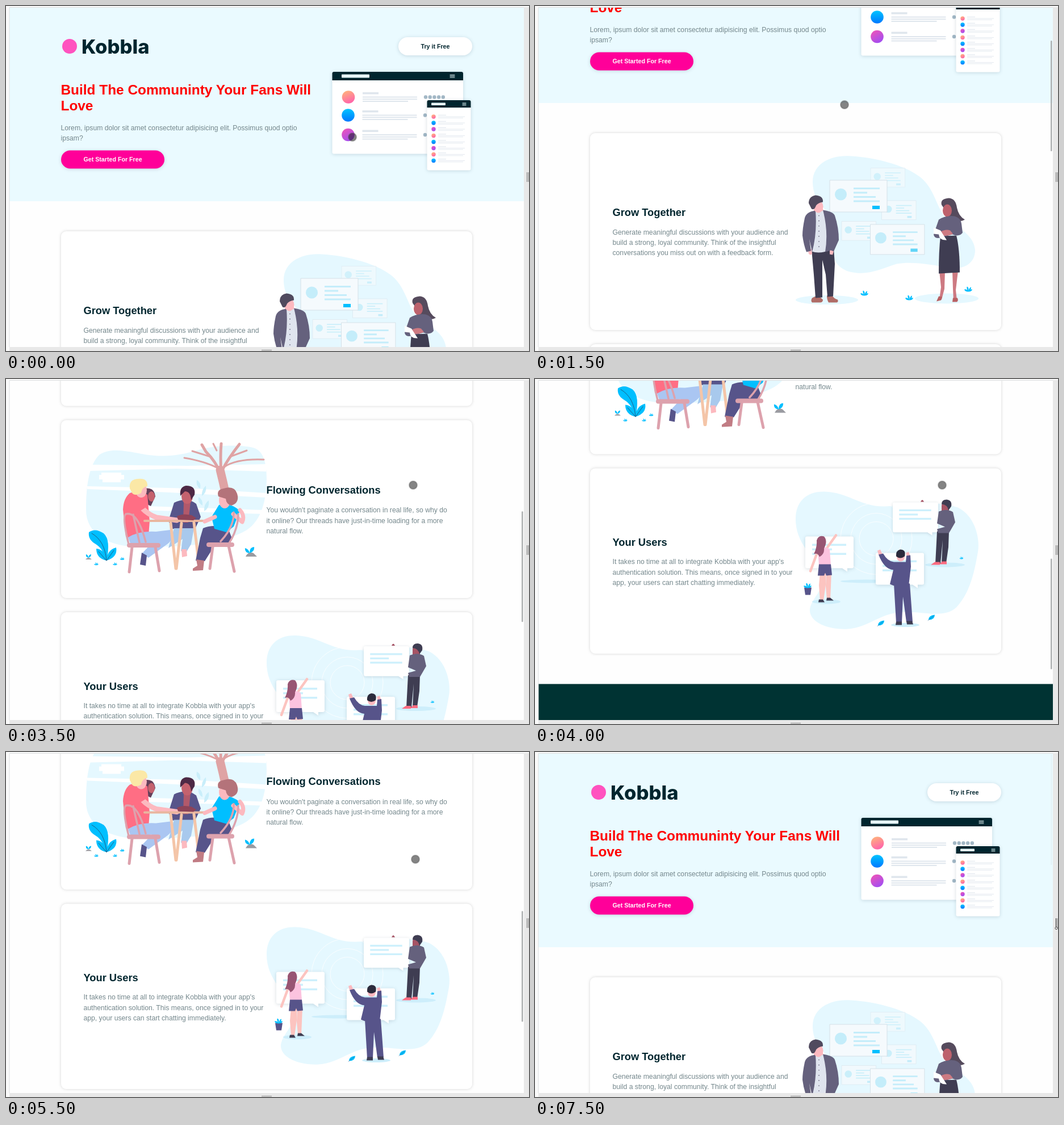
Animation, 921 px wide and 608 px high, one loop 8000 ms. Source, as an HTML page:

```html
<!DOCTYPE html>
<html lang="en">
<head>
<meta charset="utf-8">
<title>Kobbla landing page</title>
<style>
@property --s { syntax: "<number>"; inherits: true; initial-value: 0; }
@property --x { syntax: "<number>"; inherits: true; initial-value: 0; }
@property --y { syntax: "<number>"; inherits: true; initial-value: 0; }
@property --bar { syntax: "<number>"; inherits: true; initial-value: 0; }
@property --grip { syntax: "<number>"; inherits: true; initial-value: 0; }

html, body { margin: 0; width: 100%; height: 100%; overflow: hidden; background: #fafafa; }
#stage { display: block; width: 921px; height: 608px; animation: tour 8s step-end infinite; }

/* s: scroll, x/y: pointer, bar: scrollbar opacity, grip: hovering the splitter */
@keyframes tour {
  0%      { --s: 0;      --x: 610; --y: 231; --bar: 0;   --grip: 0; }
  6.25%   { --s: 0;      --x: 592; --y: 212; --bar: 0;   --grip: 0; }
  12.5%   { --s: 0;      --x: 560; --y: 185; --bar: 0;   --grip: 0; }
  18.75%  { --s: 173;    --x: 545; --y: 174; --bar: 1;   --grip: 0; }
  25%     { --s: 299;    --x: 700; --y: 185; --bar: 1;   --grip: 0; }
  31.25%  { --s: 425.5;  --x: 717; --y: 187; --bar: 1;   --grip: 0; }
  37.5%   { --s: 561;    --x: 717; --y: 187; --bar: 1;   --grip: 0; }
  43.75%  { --s: 696.5;  --x: 717; --y: 187; --bar: 1;   --grip: 0; }
  50%     { --s: 950;    --x: 717; --y: 187; --bar: 1;   --grip: 0; }
  56.25%  { --s: 1197.5; --x: 720; --y: 189; --bar: 1;   --grip: 0; }
  62.5%   { --s: 1197.5; --x: 721; --y: 189; --bar: .15; --grip: 0; }
  68.75%  { --s: 840;    --x: 721; --y: 189; --bar: 1;   --grip: 0; }
  75%     { --s: 440;    --x: 724; --y: 190; --bar: 1;   --grip: 0; }
  81.25%  { --s: 72.5;   --x: 727; --y: 191; --bar: 1;   --grip: 0; }
  87.5%   { --s: 0;      --x: 908; --y: 292; --bar: .6;  --grip: 0; }
  93.75%, 100% { --s: 0; --x: 918; --y: 310; --bar: .1;  --grip: 1; }
}
#page { transform: translateY(calc(var(--s) * -1px)); }
#thumb { transform: translateY(calc(var(--s) * .329px)); opacity: var(--bar); }
#pointer { transform: translate(calc(var(--x) * 1px), calc(var(--y) * 1px)); opacity: calc(1 - var(--grip)); }
#grip { opacity: var(--grip); }

text { font: 12.2px "Liberation Sans", Arial, sans-serif; fill: #74878c; }
.logo { font: 800 34.5px Inter, sans-serif; fill: #00252e; }
.title { font-size: 24.4px; font-weight: bold; fill: #f00; }
.head { font-size: 18.3px; font-weight: bold; fill: #00252e; }
.btn { font-size: 10.68px; font-weight: bold; text-anchor: middle; }
.foot text { fill: #fff; }
.panel { fill: #fff; filter: drop-shadow(0 0 2.5px rgba(0,0,0,.17)); }
.soft { filter: drop-shadow(0 1px 3px rgba(0,40,60,.16)); }
.line { fill: none; stroke-linecap: round; stroke-linejoin: round; }
.sky { fill: #e5f8ff; }
.blue { fill: #00bfff; }
.slate { fill: #65617d; }
.night { fill: #3f3d52; }
.indigo { fill: #57548a; }
.skin { fill: #fcb9bf; }
.tan { fill: #cd7a82; }
</style>
</head>
<body>
<svg id="stage" viewBox="0 0 921 608">
<defs>
  <linearGradient id="peach" x2=".4" y2="1"><stop stop-color="#ffb978"/><stop offset="1" stop-color="#ff68a8"/></linearGradient>
  <linearGradient id="azure" x2="0" y2="1"><stop stop-color="#00c4ff"/><stop offset="1" stop-color="#0078ff"/></linearGradient>
  <linearGradient id="violet" x2=".6" y2="1"><stop stop-color="#f455b4"/><stop offset="1" stop-color="#a44df0"/></linearGradient>

  <g id="row"><path d="M25-8.5h28v3.5h-28zM25-1h96v2h-96zM25 2.8h96v2h-96zM25 6.6h80v2h-80z" fill="#dfe6ed"/><circle r="11.3"/></g>
  <g id="mini"><path d="M8-3.3h14v1.2h-14zM8-.5h47v1h-47zM8 1.7h44v1h-44z" fill="#e4e9f0"/><circle r="3.7"/></g>
  <g id="post">
    <path d="M0 0h101v56h-101z" fill="#f5fafd" stroke="#d4e0e7"/>
    <circle cx="19.5" cy="25" r="10.5" fill="#c4edfa"/>
    <path d="M42 13h46v3h-46zM42 20.5h24v3h-24zM42 28h39v3h-39zM42 35.5h46v3h-46z" fill="#c4edfa"/>
    <path d="M75 45h13v6h-13z" fill="currentColor"/>
  </g>
  <g id="sprout" class="blue"><path d="M0 4Q-6 4-7 0Q-2-1 0 4Q-4-3-2-5Q2-3 0 4Q2-4 5-4Q5 1 0 4Q4-1 7 0Q6 4 0 4z"/></g>
  <g id="bubble">
    <path class="soft" d="M3 0h79q3 0 3 3v50q0 3-3 3h-8v6l-9-6h-62q-3 0-3-3v-50q0-3 3-3z" fill="#fff"/>
    <path d="M12 13h60v3.5h-60zM12 21h35v3.5h-35zM12 29h60v3.5h-60z" fill="#cdf0fc"/>
  </g>
  <g id="leaf"><path class="blue" d="M-5 4Q-5-4 6-5Q6 4-5 4z"/><path class="line" d="M-6 5L4-3" stroke="#2a6b9c" stroke-width=".6"/></g>
</defs>

<svg x="6" y="2" width="906" height="599" viewBox="6 2 906 599">
<g id="page">
  <path d="M6 2h906v1800h-906z" fill="#fefefe"/>

  <!-- hero -->
  <path d="M6 2h906v342h-906z" fill="#eafaff"/>
  <circle cx="112" cy="71" r="13" fill="#ff52bf"/>
  <text class="logo" x="133" y="84">Kobbla</text>
  <rect class="soft" x="691" y="55" width="130" height="32" rx="16" fill="#fff"/>
  <text class="btn" x="756" y="74.5" style="fill:#00252e">Try it Free</text>
  <text class="title" x="96.5" y="155.6">Build The Communinty Your Fans Will</text>
  <text class="title" x="96.5" y="183.6">Love</text>
  <text x="96.5" y="219.3">Lorem, ipsum dolor sit amet consectetur adipisicing elit. Possimus quod optio</text>
  <text x="96.5" y="237.4">ipsam?</text>
  <rect class="soft" x="97" y="254.5" width="182" height="32" rx="16" fill="#f09"/>
  <text class="btn" x="188" y="274" style="fill:#fff">Get Started For Free</text>

  <g>
    <rect class="soft" x="574.5" y="116" width="230.5" height="144.5" rx="3" fill="#fff"/>
    <path d="M574.5 131v-12q0-3 3-3h224.500q3 0 3 3v12z" fill="#00252e"/>
    <rect x="591" y="120.500" width="49" height="6" rx="1" fill="#e8f6f8"/>
    <path class="line" d="M782 121.500h8m-8 2.200h8m-8 2.200h8" stroke="#e8f6f8"/>
    <use href="#row" x="603" y="160.500" fill="url(#peach)"/>
    <use href="#row" x="602.500" y="192.500" fill="url(#azure)"/>
    <use href="#row" x="602.500" y="227" fill="url(#violet)"/>
    <path class="line" d="M739 160.500h32M738 192.500h.01M738 227h.01" stroke="#a3b8c6" stroke-width="6.400" stroke-dasharray=".01 7.700"/>
    <rect class="soft" x="741.500" y="166" width="77" height="123.500" rx="3" fill="#fff"/>
    <path d="M741.500 179v-10q0-3 3-3h71q3 0 3 3v10z" fill="#00252e"/>
    <rect x="749" y="170.500" width="25" height="4.500" rx="1" fill="#e8f6f8"/>
    <path class="line" d="M804 171h6m-6 2h6m-6 2h6" stroke="#e8f6f8" stroke-width=".9"/>
    <g fill="url(#peach)"><use href="#mini" x="753" y="195"/><use href="#mini" x="753" y="228.500"/><use href="#mini" x="753" y="261.500"/></g>
    <g fill="url(#azure)"><use href="#mini" x="753" y="206"/><use href="#mini" x="753" y="239.500"/><use href="#mini" x="753" y="272.500"/></g>
    <g fill="url(#violet)"><use href="#mini" x="753" y="217"/><use href="#mini" x="753" y="250.500"/></g>
  </g>

  <!-- panels -->
  <rect class="panel" x="97" y="397" width="724" height="347" rx="9"/>
  <rect class="panel" x="97" y="769" width="724" height="313.500" rx="9"/>
  <rect class="panel" x="97" y="1107.500" width="724" height="326.500" rx="9"/>

  <text class="head" x="136.500" y="543">Grow Together</text>
  <text x="136.500" y="576">Generate meaningful discussions with your audience and</text>
  <text x="136.500" y="594.200">build a strong, loyal community. Think of the insightful</text>
  <text x="136.500" y="612.400">conversations you miss out on with a feedback form.</text>

  <text class="head" x="458.500" y="898">Flowing Conversations</text>
  <text x="458.500" y="931.800">You wouldn't paginate a conversation in real life, so why do</text>
  <text x="458.500" y="950">it online? Our threads have just-in-time loading for a more</text>
  <text x="458.500" y="968.200">natural flow.</text>

  <text class="head" x="136.500" y="1244">Your Users</text>
  <text x="136.500" y="1276.400">It takes no time at all to integrate Kobbla with your app's</text>
  <text x="136.500" y="1294.900">authentication solution. This means, once signed in to your</text>
  <text x="136.500" y="1313.400">app, your users can start chatting immediately.</text>

  <!-- two people and posts -->
  <g transform="translate(0 425.500)">
    <path class="sky" d="M489 57C489 25 522 9 556 12C600 14 660 30 684 54C706 76 708 108 728 126C752 141 773 154 775 178C775 200 757 212 732 209C700 204 665 197 637 202C608 211 588 222 560 217C536 213 521 196 524 168C525 138 526 125 510 105C497 91 489 78 489 57z"/>
    <ellipse class="sky" cx="514" cy="265.500" rx="55" ry="8"/>
    <ellipse class="sky" cx="725" cy="263" rx="56" ry="9"/>
    <g color="#bdeafa">
      <use href="#post" transform="translate(591 33) scale(.6)" opacity=".6"/>
      <use href="#post" transform="translate(610.500 90.500) scale(.6)" opacity=".8"/>
      <use href="#post" transform="translate(540 127) scale(.6)" opacity=".8"/>
    </g>
    <use href="#post" x="519" y="54.500" color="#00bfff"/>
    <use href="#post" transform="translate(590.500 132.500) scale(.945)" color="#62d5f7"/>

    <path d="M488 262l10-5 9 8q0 5-5 5h-14q-3-3 0-8zM514 258l8-2q5 8 11 9q2 5-3 5h-13q-3-5-3-12z" fill="#b06c66"/>
    <path class="night" d="M487 176L526 175L528 202L525 259L515 260L512 221L506 195L506 261L494 262L491 221z"/>
    <path class="skin" d="M480 176h7l1 8q-3 4-6 0zM519 176h8l-3 10-5-1zM491 99h16v13h-16z"/>
    <path d="M491 110L511 108L518 178Q501 185 487 180z" fill="#dfe4ee"/>
    <path class="slate" d="M494 108Q478 110 475 121Q471 140 471 152Q473 168 478 181L486 179L483 158L488 181Q497 148 494 108zM507 107Q526 110 528 117Q535 138 535 160L526 180L521 178L511 181Q517 145 507 107z"/>
    <path class="line" d="M500 117v55" stroke="#55516a" stroke-width="1.600" stroke-dasharray=".1 9"/>
    <ellipse cx="499" cy="101" rx="8.500" ry="11" class="skin"/>
    <path d="M482 95Q482 83 494 81Q508 82 507 93Q499 94 495 99Q492 108 487 105Q484 99 482 95z" fill="#504a5e"/>

    <path d="M716 98Q713 87 729 86Q741 87 743 103Q746 118 757 124Q746 130 737 122Q724 120 723 108z" fill="#564b5d"/>
    <ellipse cx="726" cy="108" rx="8" ry="11" fill="#bd626d"/>
    <path class="tan" d="M712 214h10l-1 32-5 19h-4l3-22zM735 214h10l-4 34 2 18h-6l-1-20z"/>
    <path d="M711 259l6 1-2 6-8 2zM736 262h8q2 5-1 7h-8z" fill="#b85f62"/>
    <path class="night" d="M714 153L742 152Q748 175 748 217L711 219Q711 179 714 153z"/>
    <path class="slate" d="M711 124Q724 116 739 118Q750 121 751 131L753 147Q747 155 735 150L713 156Q703 158 702 150z"/>
    <path class="tan" d="M713 146q10-6 18-3l5 6q-10 5-21 3z"/>
    <path d="M702 138L714 143L725 160Q712 161 711 150L702 149z" fill="#fff"/>
    <use href="#sprout" x="580" y="254"/><use href="#sprout" x="659" y="262"/><use href="#sprout" x="763" y="247"/>
  </g>

  <!-- four people at a table -->
  <g transform="translate(0 696.500)">
    <path class="sky" d="M141 231C141 188 146 151 165 133C184 121 208 126 239 132C280 140 312 133 335 126C370 115 417 116 435 121C456 126 459 155 459 177C458 218 449 254 417 270C372 292 300 298 250 294C200 301 141 282 141 231z"/>
    <path d="M148 151L320 153L458 150V163L300 158L146 162zM143 189L330 193L459 201V209L290 200L143 194zM250 224L455 231V238L240 231zM168 165h35v4h5v8h-6v5h-32v-5h-6v-8h4z" fill="#fff"/>
    <g class="line" stroke="#dfa3a4">
      <path d="M387 203Q382 180 377 160" stroke-width="15"/>
      <path d="M378 167Q370 146 352 128L345 116M379 163Q377 138 379 114M381 160Q392 139 411 115" stroke-width="5"/>
      <path d="M373 157Q350 145 314 139M384 155Q407 140 454 142M360 137L328 127M397 136L424 126M371 126L365 114" stroke-width="3"/>
    </g>
    <path d="M336 178q8 4 6 15q-8-4-6-15zM352 188q-8 7-7 18q9-6 7-18zM339 208q8 4 7 15q-9-5-7-15zM357 214q-9 6-8 19q10-6 8-19z" fill="#c9eefa"/>

    <path d="M244 193Q261 190 263 207L255 224L243 218z" fill="#65405a"/>
    <ellipse cx="256" cy="207" rx="6" ry="9" fill="#c5626e"/>
    <path class="indigo" d="M296 218Q319 207 335 220L343 243L332 266L293 264L286 250z"/>
    <path d="M313 216h12l-4 37h-9z" fill="#b2596b"/>
    <ellipse cx="319" cy="207" rx="10" ry="13" fill="#c5626e"/>
    <path d="M307 206Q305 190 317 188Q335 188 332 204L326 213Q325 198 315 198z" fill="#4d2945"/>
    <path d="M296 263h35l-5 28-9 15-9-3 3-21-25 16z" fill="#a8c9ed"/>
    <path class="skin" d="M309 300h9l1 12-9 2z"/>

    <path d="M218 201L235 196L249 204L253 251L250 288L211 278L206 230Q207 210 218 201z" fill="#ff6e84"/>
    <path class="line" d="M235 222Q246 237 265 244L301 249" stroke="#fcb9bf" stroke-width="9"/>
    <path d="M220 207Q238 202 245 227L232 235L214 228z" fill="#ff6e84"/>
    <ellipse class="skin" cx="238" cy="196" rx="10" ry="13"/>
    <path d="M218 193Q216 177 232 176Q250 174 249 189Q240 190 238 201Q227 207 222 201z" fill="#fbe8a6"/>
    <path d="M215 279Q235 267 264 269L289 266Q298 281 284 291L251 315L239 308L257 289L220 293z" fill="#aac6f2"/>
    <path class="indigo" d="M239 306l9 5-2 18-10-2z"/>

    <path class="line" d="M244 250H352" stroke="#e9b69f" stroke-width="4"/>
    <g class="line" stroke="#f4c5a8" stroke-width="5"><path d="M290 254L299 334M309 254L300 334M331 253L339 320"/></g>
    <path d="M301 242q9-6 26-2l8 5-5 4-27-1z" fill="#8d4358"/>

    <path class="indigo" d="M347 263Q365 255 391 263L398 281Q393 294 369 291L350 321L334 320L342 280z"/>
    <path d="M335 318l14 2-2 17-18 1v-4l8-5z" fill="#c17c84"/>
    <path d="M375 222Q394 217 412 232L401 260L388 270L367 264L362 243z" fill="#00bfff"/>
    <path class="line" d="M368 243L350 251M412 231Q421 241 416 252L400 238" stroke="#fcb9bf" stroke-width="7"/>
    <ellipse class="skin" cx="385" cy="214" rx="10" ry="14"/>
    <path d="M374 207Q370 195 383 193Q402 187 407 202Q412 218 397 223Q388 221 387 211z" fill="#b4737a"/>

    <g class="line" stroke="#dda2ad">
      <path d="M216 291Q204 242 211 238Q232 233 246 287M224 239L235 288" stroke-width="3.500"/>
      <path d="M392 291Q409 264 409 238M401 235Q402 260 378 286" stroke-width="3.500"/>
      <path d="M217 293H268M357 292H398" stroke-width="8"/>
      <path d="M222 296L217 340M263 296L270 338M364 296L359 334M392 294L402 339" stroke-width="5"/>
    </g>

    <path class="blue" d="M177 320Q171 299 158 291Q144 283 146 270Q157 262 172 272Q185 284 177 320zM177 320Q159 316 159 299Q174 300 177 320zM177 320Q178 301 194 297Q197 314 177 320z"/>
    <path class="line" d="M151 272Q174 285 177 320L163 304M177 320L190 302" stroke="#29476d" stroke-width=".8"/>
    <g transform="translate(159 326) scale(.55)"><use href="#sprout"/><use href="#sprout" x="60"/><use href="#sprout" x="83" y="-17"/></g>
    <path d="M140 318q5-6 11 0zM422 313q5-10 14-6l6 6z" fill="#9a9ba1"/>
    <path class="blue" d="M145 315q-5-1-4-6q4 1 4 6q1-6 5-6q0 5-5 6zM429 307q-9-1-8-9q7 2 8 9q0-11 8-11q1 8-8 11z"/>
  </g>

  <!-- three people and bubbles -->
  <g transform="translate(0 696.500)">
    <path class="sky" d="M459 500C459 469 479 451 510 452C552 453 573 479 616 478C658 476 705 466 745 480C775 495 784 535 780 558C774 592 767 629 742 656C720 676 685 663 650 664C608 665 589 691 551 694C514 696 482 681 484 659C488 637 510 628 503 602C495 564 459 548 459 500z"/>
    <g fill="none" stroke="#fff" stroke-opacity=".8"><circle cx="601" cy="535" r="30"/><circle cx="601" cy="535" r="45"/><circle cx="601" cy="535" r="63"/></g>
    <g fill="#cdeefb"><ellipse cx="585" cy="610" rx="47" ry="3"/><ellipse cx="722" cy="581" rx="35" ry="4"/><ellipse cx="513" cy="646" rx="25" ry="4"/><ellipse cx="652" cy="687" rx="25" ry="3.500"/></g>
    <use href="#bubble" transform="translate(630 471) scale(.94)"/>
    <use href="#bubble" x="476" y="531"/>
    <use href="#bubble" x="600" y="560"/>

    <path d="M679 470q3-7 6 0zM716 477h13v11h-13z" fill="#a65465"/>
    <ellipse cx="723" cy="477" rx="7" ry="9" fill="#a65465"/>
    <path class="night" d="M708 522h21l-1 28-4 28h-8l2-41-4 42h-9z"/>
    <path class="slate" d="M711 487Q725 481 736 488L740 506L729 525H710L708 518L722 514L708 508z"/>
    <path class="night" d="M716 474q0-8 9-8q10 1 8 12l-5 7q-1-10-12-11z"/>
    <path d="M704 576h9v5h-16zM717 575h8v5h-13z" fill="#ff6b80"/>

    <path class="line" d="M515 550L530 529M496 562L485 592" stroke="#fcc4c0" stroke-width="4.500"/>
    <path d="M502 594h10v22l-4 28h-6l-2-27zM513 594h9l-1 25-1 23h-6l-2-23z" fill="#fcc4c0"/>
    <path d="M498 554Q511 546 519 554L521 582H500z" fill="#fcc3df"/>
    <path class="indigo" d="M500 580h21l2 19-10 1-2-5-2 5h-11z"/>
    <path d="M496 538Q499 528 509 531Q516 539 509 552Q510 562 501 567Q498 559 491 562Q497 550 496 538z" fill="#985573"/>
    <path class="night" d="M500 642h7l3 5h-11zM514 639h6l6 5h-13z"/>
    <path class="indigo" d="M474 621h13l-2 13h-9z"/><use href="#sprout" x="480" y="618"/>

    <path class="skin" d="M605 563l-2-7 5-2 4 9zM655 567l-2-7 5-2 3 9z"/>
    <path class="indigo" d="M605 563L613 561Q621 575 632 576L653 576L654 565L661 564L662 584L658 618Q645 624 625 615L631 590Q615 589 605 563zM632 615L660 614L665 682H654L648 637L646 683H636z"/>
    <ellipse class="skin" cx="644" cy="567" rx="7" ry="8"/>
    <path d="M636 566Q635 556 643 554Q654 554 651 566Q643 572 636 566z" fill="#2c2b3c"/>
    <path class="night" d="M636 681h10v6h-11zM654 680h10l2 6h-11z"/>
    <use href="#leaf" x="609" y="684"/><use href="#leaf" x="698" y="674"/>
    <use href="#sprout" transform="translate(751 569) scale(.5)"/>
  </g>

  <!-- footer -->
  <g class="foot" transform="translate(0 1197.500)">
    <path d="M6 290h906v320h-906z" fill="#033"/>
    <circle cx="112" cy="395" r="13" fill="#fff"/>
    <text class="logo" x="133" y="408">Kobbla</text>
    <text x="123" y="434.400">Lorem ipsum dolor sit amet, consectetur adipiscing elit, sed do eiusmod tempor incididunt ut labore</text>
    <text x="123" y="449.500">et dolore magna aliqua</text>
    <text x="123" y="477">+1-202-555-0147</text>
    <text x="123" y="505">hello@kobbla.test</text>
    <text x="688.500" y="434.400">About Us</text>
    <text x="688.500" y="462.400">What We</text>
    <text x="688.500" y="476.800">Do</text>
    <text x="688.500" y="505">FAQ</text>
    <text x="771.500" y="434.400">Career</text>
    <text x="771.500" y="462.400">Blog</text>
    <text x="771.500" y="490.600">Contact</text>
    <text x="771.500" y="505">Us</text>
  </g>
</g>
<rect id="thumb" x="908" y="4" width="2.500" height="195" rx="1.200" fill="#adb0b1"/>
</svg>

<!-- window frame -->
<path d="M912 2h9v606h-9zM6 601h915v7h-915z" fill="#e8e8e8"/>
<path d="M6 601V2.500H912" fill="none" stroke="#dcdfe0"/>
<path d="M917.500 293v17M920 293v17M450 606.500h18" stroke="#8c8c8c" stroke-width="1.200"/>
<g id="grip" stroke="#333"><path d="M917.500 293v15"/><circle cx="918" cy="310.500" r="2" fill="#fff"/></g>
<circle id="pointer" r="7" fill="#141414" fill-opacity=".52" stroke="#555" stroke-opacity=".4" stroke-width="2"/>
</svg>
</body>
</html>
```
